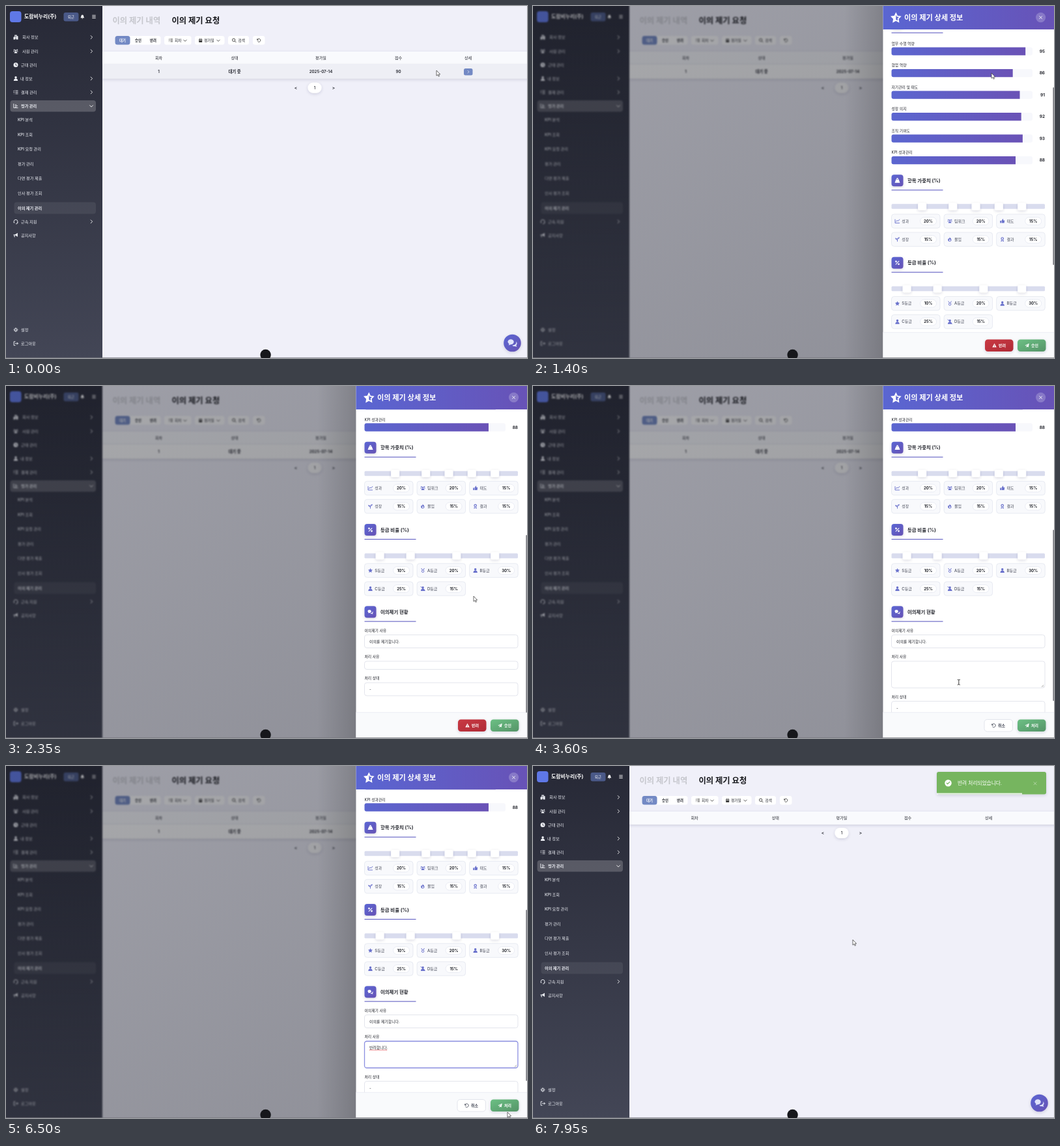
Animation of 800 by 541 pixels, one loop 8000 ms. Source, as an HTML page:

```html
<!DOCTYPE html>
<html lang="ko">
<head>
<meta charset="utf-8">
<style>
html, body { margin: 0; width: 100%; height: 100%; overflow: hidden; background: #20222c; }
svg { display: block; width: 800px; height: 541px; }
text { font-family: Inter, 'Noto Sans CJK KR', 'Noto Sans CJK', sans-serif; white-space: pre; }
</style>
</head>
<body>
<svg id="stage" viewBox="0 0 800 541"></svg>
<script>
const circ = (x, y, r) => `M${x - r} ${y}a${r} ${r} 0 1 0 ${2 * r} 0a${r} ${r} 0 1 0 ${-2 * r} 0z`;

// Icons live in a box from -6 to 6; a leading ~ means stroked.
const icons = {
  building: 'M-6-1h3v-5h6v3h3v9h-12zM-1.5-4h3v1.6h-3zM-1.5-1h3v1.6h-3zM-1 3h2v3h-2z',
  users: circ(0, -2, 2) + circ(-4, -3.5, 1.5) + circ(4, -3.5, 1.5) + 'M-4 5c0-6 8-6 8 0zM-6 2c0-4 3-4 3-2zM6 2c0-4-3-4-3-2z',
  clock: circ(0, 0, 6) + 'M-.7-4v4.6l3 2 .8-1.2-2.4-1.5V-4z',
  user: circ(0, -3, 3) + 'M-5.5 6c0-8 11-8 11 0z',
  slash: '~M-6-6L6 6',
  list: '~M-6-4l1 1 2-2M-6 0l1 1 2-2M-5 4h1M-1-4h7M-1 0h7M-1 4h7',
  chart: '~M-5.5-6V5H6M-2-3h4M-2 0h7M-2 3h4',
  headset: '~M-5 3V0a5 5 0 0 1 10 0v4l-3 2H0M-4 1v3M4 1v3',
  horn: 'M-6-2h4l7-4v10l-7-4h-1l1 5h-2l-1-5h-1z',
  gear: '~' + circ(0, 0, 3) + 'M0-6v3M0 3v3M-6 0h3M3 0h3M-4-4l2 2M2 2l2 2M-4 4l2-2M2-2l2-2',
  logout: '~M-1-5h-4v10h4M-2 0h8M3-3l3 3-3 3',
  star: 'M0-6l1.8 3.8 4.2.6-3 3 .7 4.2-3.7-2-3.7 2 .7-4.2-3-3 4.2-.6z',
  outline: '~M0-6l1.8 3.8 4.2.6-3 3 .7 4.2-3.7-2-3.7 2 .7-4.2-3-3 4.2-.6z',
  half: 'M0-6v9.6l-3.7 2 .7-4.2-3-3 4.2-.6z',
  clip: 'M-4-5h2v-1h4v1h2v11h-8zM-2-1h4v1h-4zM-2 2h4v1h-4z',
  weight: 'M-3-3h6l3 8h-12z' + circ(0, -4, 2),
  percent: '~M-4 4L4-4' + circ(-3, -3, 1.3) + circ(3, 3, 1.3),
  chats: 'M-6-1a4 3.5 0 1 1 4 3l-3 1 .8-1.5zM0 3a5 4 0 0 0 5-5c2 2 1 4 0 5l1 2-3-.8q-2 .5-3-1.2z',
  line: '~M-6-5V5H6M-4 2l3-4 3 2 4-5',
  thumb: 'M-6-1h3v6h-3zM-2-1l3-5q2 0 1.5 2l-.5 2h4l-1 7h-7z',
  seed: '~M0 6V0M0 1q-1-4-5-4 0 4 5 4M0-1q1-4 5-4 0 4-5 4',
  fire: 'M-1-6q5 3 5 7a4.5 4.5 0 1 1-9 0q0-3 2-4l1 2q2-2 1-5z' + circ(0, 2, 2),
  award: circ(0, -2, 4) + circ(0, -2, 2) + 'M-3 2l-1 4 3-1 1-2 1 2 3 1-1-4q-3 2-6 0z',
  medal: '~' + circ(0, 2, 3) + 'M-4-6l3 5M4-6l-3 5',
  warn: 'M0-6l6 11h-12zM-.7-2v3.5h1.4v-3.5zM-.7 2.7v1.3h1.4v-1.3z',
  plane: 'M6-6l-2 11-4-2-2 3v-4l6-6-7 5-3-1.3z',
  undo: '~M-5-5v4h4M-5-1a5 5 0 1 1 1 4',
  check: circ(0, 0, 6) + 'M-3.5 0l2.5 2.5 4.5-4.5-1-1-3.5 3.5-1.5-1.5z',
  search: '~' + circ(-1, -1, 4) + 'M2 2l4 4',
  bell: 'M-5 3q2-2 2-5 0-3 3-3t3 3q0 3 2 5zM-1.5 4h3q-1.5 3-3 0z',
  bars: '~M-5-4h10M-5 0h10M-5 4h10',
  cal: 'M-5-4h2v-2h1v2h4v-2h1v2h2v10h-10zM-4-2h8v2h-8z',
  right: '~M-2-5l5 5-5 5',
  down: '~M-5-2l5 5 5-5',
  close: '~M-4-4l8 8M-4 4l8-8'
};

const icon = (name, x, y, size, color) => {
  const d = icons[name], line = d[0] === '~';
  const paint = line ? `fill="none" stroke="${color}" stroke-width="1.6"` : `fill="${color}" fill-rule="evenodd"`;
  return `<path transform="translate(${x} ${y}) scale(${size / 12})" d="${line ? d.slice(1) : d}" ${paint}/>`;
};
const text = (x, y, s, size = 6.2, weight = 500, color = '#24262e', anchor = 'start', more = '') =>
  `<text x="${x}" y="${y + size * .36}" font-size="${size}" font-weight="${weight}" fill="${color}" text-anchor="${anchor}" ${more}>${s}</text>`;
const mid = (x, y, s, size, weight, color) => text(x, y, s, size, weight, color, 'middle');
const rect = (x, y, w, h, r, fill, more = '') =>
  `<rect x="${x}" y="${y}" width="${w}" height="${h}" rx="${r}" fill="${fill}" ${more}/>`;
const group = (id, body, more = '') => `<g id="${id}" ${more}>${body}</g>`;
const grad = (id, a, b, dir = 'x2="1" y2="1"') =>
  `<linearGradient id="${id}" x1="0" y1="0" ${dir}><stop stop-color="${a}"/><stop offset="1" stop-color="${b}"/></linearGradient>`;
const shade = 'filter="url(#soft)"';
const halfStar = (x, y, s) => icon('half', x, y, s, '#fff') + icon('outline', x, y, s, '#fff');

function sidebar() {
  const pale = '#eceef4';
  let s = rect(-20, -20, 168, 581, 0, 'url(#side)') + rect(6, 8, 17.5, 17, 4, '#5f78e6') +
    text(28, 16.5, '도람비누리(주)', 7.9, 700, '#fff') +
    rect(88.5, 10, 23, 13.5, 3, '#4a5988') + mid(100, 16.7, '퇴근', 5.4, 500, '#fff') +
    icon('bell', 117.3, 16.5, 7, '#fff') + icon('bars', 135, 16.5, 6.5, '#fff') +
    rect(6.5, 145, 131.5, 17.5, 4, '#fff', 'opacity=".2"') +
    rect(12.5, 301.5, 125.5, 18, 4, '#fff', 'opacity=".07"');
  [['building', '회사 정보', 48, 1, 25], ['users', '사원 관리', 69.5, 1, 25], ['clock', '근태 관리', 90.5, 0, 23],
   ['user', '내 정보', 111.5, 1, 22], ['list', '결재 관리', 132.5, 1, 23], ['chart', '평가 관리', 153.5, 2, 23],
   ['headset', '근속 지원', 331.3, 1, 23], ['horn', '공지사항', 352.3, 0, 23],
   ['gear', '설정', 497.7, 0, 23], ['logout', '로그아웃', 518.7, 0, 23]
  ].forEach(([ic, label, y, arrow, x]) => {
    s += icon(ic, 15, y, 7, pale) + text(x, y, label, 6.2, arrow > 1 ? 700 : 500, pale);
    if (arrow) s += icon(arrow > 1 ? 'down' : 'right', 131, y, 6.5, '#fff');
  });
  ['KPI 분석', 'KPI 조회', 'KPI 요청 관리', '평가 관리', '다면 평가 제출', '인사 평가 조회', '이의 제기 관리']
    .forEach((label, i) => s += text(18, 174.7 + i * 22.6, label, 6.2, i > 5 ? 700 : 500, pale));
  return s;
}

const pager = y => rect(463.5, y - 8, 21, 16, 8, '#fff', shade) + mid(474, y, '1', 6) +
  mid(445, y, '&lt;', 6.5, 600) + mid(503, y, '&gt;', 6.5, 600);
const heads = xs => ['회차', '상태', '평가일', '점수', '상세'].map((h, i) => mid(xs[i], 79.5, h, 6.1)).join('');

function page() {
  const box = (x, w) => rect(x, 46, w, 13.5, 3.5, '#fff');
  return rect(148, -20, 680, 581, 0, '#f0f0f9') +
    text(163.5, 23, '이의 제기 내역', 12.3, 700, '#c6c7cd') + text(254.5, 23, '이의 제기 요청', 12.3, 700, '#17181c') +
    box(167, 70.5) + box(243, 41.5) + box(290, 45.5) + box(341, 32) + box(379, 18.5) +
    rect(167.5, 46, 23, 13.5, 3.5, '#7389c4') + mid(179, 52.8, '대기', 5.4, 600, '#fff') +
    mid(203, 52.8, '승인', 5.4, 600) + mid(226, 52.8, '반려', 5.4, 600) +
    icon('list', 253, 52.8, 6, '#333') + text(259, 52.8, '회차', 5.6) + icon('down', 275, 52.8, 6, '#333') +
    icon('cal', 298.7, 52.8, 6, '#333') + text(304.2, 52.8, '평가일', 5.6) + icon('down', 326, 52.8, 6, '#333') +
    icon('search', 350.2, 52.8, 6.5, '#333') + text(356.6, 52.8, '검색', 5.6) + icon('undo', 388.3, 52.8, 6, '#333') +
    rect(148, 70, 680, 19.8, 0, '#f9fafd', shade) +
    group('full', heads([234.5, 351, 483.5, 602.5, 709.5]) +
      rect(148, 90, 680, 21.5, 0, '#fff', shade + ' id="row"') +
      mid(234.5, 101, '1', 6.2, 600) + mid(351, 101, '대기 중', 6.4, 600) +
      mid(483.5, 101, '2025-07-14', 6.2, 600) + mid(602.5, 101, '90', 6.2, 600) +
      rect(703, 96, 13.5, 10.5, 2.5, '#7389c4') + icon('right', 709.7, 101.2, 5, '#fff') + pager(125.7)) +
    group('empty', heads([248, 372.3, 474, 575.5, 699.5]) + pager(103)) +
    `<circle cx="777.5" cy="518" r="13.3" fill="url(#violet)" ${shade}/>` + icon('chats', 777.5, 518, 14, '#dfe3fb');
}

const tile = (x, y, w, h, more = '') => rect(x, y, w, h, 3.5, '#fff', `stroke="#dcdfe8" stroke-width=".8" ${more}`);
const field = (x, y, w, label, value) =>
  text(x, y - 17, label, 5.8) + tile(x, y - 10, w, 20) + text(x + 7.5, y, value, 5.9, 400);
const section = (y, ic, title) => rect(550.5, y - 9, 18, 18, 4, 'url(#violet)', shade) +
  (ic === 'half' ? halfStar(559.5, y, 8) : icon(ic, 559.5, y, 8, '#fff')) +
  text(575, y, title, 7.4, 700) + rect(550.5, y + 14, 79, 1.1, 0, '#6260c4');

function split(y, parts) {
  let s = rect(550.5, y - 3.8, 235.5, 7.5, 1.5, '#d9dcee'), sum = 0;
  parts.forEach(([ic, label, pct], i) => {
    const x = 550.5 + i % 3 * 80.6, cy = y + 22.5 + (i > 2) * 28;
    s += rect(x, cy - 10.7, 74.5, 21.4, 4, '#f8f9fc', 'stroke="#e3e6ef" stroke-width=".8"') +
      icon(ic, x + 9, cy, 7, '#6a72cc') + (label[0] === 'D' ? icon('slash', x + 9, cy, 7, '#6a72cc') : '') +
      text(x + 15.8, cy, label, 6, 500, '#4a4e5c') +
      rect(x + 44, cy - 6, 25, 12, 6, '#fff', 'stroke="#e3e6ef" stroke-width=".7"') + mid(x + 56.5, cy, pct + '%', 6, 700);
    sum += pct;
    if (sum < 100) s += rect(544 + sum * 2.355, y - 5.5, 13, 11, 2.5, '#fff', shade);
  });
  return s;
}

function content() {
  const bars = [['업무 수행 역량', 95], ['협업 역량', 86], ['자기관리 및 태도', 91], ['성장 의지', 92], ['조직 기여도', 93], ['KPI 성과관리', 88]];
  return section(53, 'clip', '인사 평가 정보') +
    field(550.5, 98, 113, '회차', '1') + field(673, 98, 113, '사원명', '남도율 (20240007)') +
    field(550.5, 138.5, 113, '점수', '90') + field(673, 138.5, 113, '평가일', '2024-01-22') +
    section(174, 'half', '요인별 평가 결과') +
    bars.map(([label, v], i) => {
      const y = 217 + i * 33.5;
      return text(550.5, y - 11.8, label, 5.8, 400) + rect(550.5, y - 6.2, 216.5, 12.4, 3, '#f7f8fc') +
        `<path d="M${550.5 + 2.165 * v} ${y - 6.2}v12.4H553.5q-3 0-3-3v-6.4q0-3 3-3z" fill="url(#bar)"/>` +
        text(786, y, v, 6.4, 700, '#24262e', 'end');
    }).join('') +
    section(415.7, 'weight', '항목 가중치 (%)') +
    split(455.5, [['line', '성과', 20], ['users', '팀워크', 20], ['thumb', '태도', 15], ['seed', '성장', 15], ['fire', '몰입', 15], ['award', '결과', 15]]) +
    section(542, 'percent', '등급 비율 (%)') +
    split(582, [['star', 'S등급', 10], ['medal', 'A등급', 20], ['user', 'B등급', 30], ['user', 'C등급', 25], ['user', 'D등급', 15]]) +
    section(668.3, 'chats', '이의제기 현황') +
    field(550.5, 713.5, 235.5, '이의제기 사유', '이의를 제기합니다.') +
    text(550.5, 736.6, '처리 사유', 5.8) + tile(550.5, 744, 235.5, 12.5, 'id="area"') +
    group('typing', text(558, 754, '', 5.8, 400, '#24262e', 'start', 'id="typed"') +
      rect(0, 750, .6, 7.5, 0, '#222', 'id="caret"') +
      '<path id="wave" d="M558 757.6h27" stroke="#e0454a" stroke-width="1" stroke-dasharray="1.2 .8"/>' +
      '<path d="M781 783.5l3-3M783 783.5l1-1" stroke="#666" stroke-width=".6"/>') +
    group('status', field(550.5, 787, 235.5, '처리 상태', '-'));
}

const button = (x, fill, ic, label, color, more = shade) =>
  rect(x, 512.5, 43.5, 18.5, 4.5, fill, more) + icon(ic, x + 14.5, 521.8, 6.5, color) + text(x + 21, 521.8, label, 6, 600, color);

const panel = () => rect(537.5, 0, 270, 541, 0, '#fff') +
  `<g clip-path="url(#view)">${group('scroll', content())}</g>` +
  rect(537.5, 501.5, 270, 40, 0, '#f9fafc') + rect(537.5, 501.5, 270, .7, 0, '#e6e8ef') +
  group('decide', button(694, 'url(#red)', 'warn', '반려', '#fff') + button(744, 'url(#green)', 'plane', '승인', '#fff')) +
  group('submit', button(693, '#fff', 'undo', '취소', '#454957', 'stroke="#dcdfe8" stroke-width=".8"') + button(744, 'url(#green)', 'plane', '처리', '#fff')) +
  rect(537.5, 0, 270, 36, 0, 'url(#head)') + halfStar(557.3, 18, 13) +
  text(570, 18, '이의 제기 상세 정보', 11.2, 700, '#fff') +
  '<circle cx="779.6" cy="17.6" r="7.6" fill="#fff" opacity=".22"/>' + icon('close', 779.6, 17.6, 6.5, '#fff') +
  rect(798.4, 37, 1.6, 273, .8, '#77787f', 'id="thumb"');

const toast = () => rect(620, 9, 168, 34.6, 3, '#76b55f', shade) + icon('check', 637.5, 26.3, 10.5, '#fff') +
  text(652, 26.3, '반려 처리되었습니다.', 7.7, 400, '#fff') + icon('close', 771, 26.8, 7, '#b5d8a8') +
  rect(620, 41.6, 168, 2, 0, '#fff', 'id="life" opacity=".85"');

document.getElementById('stage').innerHTML = `<defs>
  ${grad('side', '#262835', '#444757', 'x2="0" y2="1"')}${grad('violet', '#5a67d4', '#6752b4')}
  ${grad('bar', '#5b66d0', '#6a52b6', 'x2="1" y2="0"')}${grad('head', '#5a66d2', '#6852b6', 'x2="1" y2="0"')}
  ${grad('red', '#c93a44', '#b02a36')}${grad('green', '#6cc084', '#559468')}
  <linearGradient id="dim" x2="1" y2="1"><stop stop-color="#15171f" stop-opacity=".37"/><stop offset="1" stop-color="#15171f" stop-opacity=".45"/></linearGradient>
  <linearGradient id="edge"><stop stop-opacity="0"/><stop offset="1" stop-opacity=".16"/></linearGradient>
  <filter id="soft" x="-20%" y="-40%" width="140%" height="200%"><feDropShadow dx="0" dy="1.5" stdDeviation="2" flood-color="#20264a" flood-opacity=".16"/></filter>
  <clipPath id="view"><rect x="537" y="36" width="263" height="466"/></clipPath></defs>` +
  group('app', page() + sidebar()) + rect(0, 0, 800, 541, 0, 'url(#dim)', 'id="veil"') +
  group('panel', rect(477.5, 0, 60, 541, 0, 'url(#edge)') + panel()) +
  rect(0, 540.3, 800, .7, 0, '#77787f') + '<circle cx="398.6" cy="536" r="8.2" fill="#16171b"/>' + group('toast', toast()) +
  '<path id="arrow" d="M0 0v8.2l1.9-1.7 1.3 2.8 1.3-.6-1.3-2.7h2.5z" fill="#fff" stroke="#333" stroke-width=".7"/>' +
  '<path id="beam" d="M-2-4q2 0 2 1 0-1 2-1M0-3v6M-2 4q2 0 2-1 0 1 2 1" fill="none" stroke="#222" stroke-width=".9"/>';

const $ = id => document.getElementById(id);
const set = (id, attrs) => Object.entries(attrs).forEach(([k, v]) => $(id).setAttribute(k, v));
const show = (id, on) => $(id).style.display = on ? '' : 'none';
const clamp = v => Math.max(0, Math.min(1, v));
const smooth = v => v * v * (3 - 2 * v);
const out = v => 1 - (1 - v) ** 3;

// Keys are [time, ...values].
function along(keys, t, ease = smooth) {
  let i = 0;
  while (i < keys.length - 2 && t >= keys[i + 1][0]) i++;
  const [a, b] = [keys[i], keys[i + 1]], p = ease(clamp((t - a[0]) / (b[0] - a[0])));
  return a.slice(1).map((v, n) => v + (b[n + 1] - v) * p);
}

const path = [[0, 661, 99], [300, 709, 101], [800, 708, 103], [1150, 708, 103], [1400, 704, 103], [1950, 704, 108],
  [2350, 718, 323], [2900, 716, 522], [3150, 716, 522], [3700, 648, 449], [5250, 648, 449], [6100, 765, 521],
  [6500, 770, 532], [6900, 768, 528], [7900, 491, 267]];
const wheel = [[1150, 0], [1400, 147], [1900, 321]];
const bounce = [[6850, 260], [7300, -4], [7412, 2], [7525, -1], [7600, 0]];
const keys = [[3850, 'ㅂ'], [3930, '바'], [4010, '반'], [4090, '반ㄹ'], [4170, '반려'], [4250, '반렿'], [4340, '반려하'], [4450, '반려합'],
  [4550, '반려합ㄴ'], [4750, '반려합니'], [4850, '반려합닏'], [4950, '반려합니다'], [5050, '반려합니다.']];

function render(t) {
  const open = out(clamp((t - 400) / 400)) * (1 - smooth(clamp((t - 6600) / 350)));
  const rejecting = t >= 3100, focus = t >= 3750, done = t >= 6900;
  const [scroll] = along(wheel, t, v => v), [x, y] = along(path, t);

  $('app').style.filter = open > 0 ? `blur(${1.3 * open}px)` : 'none';
  set('veil', { opacity: open });
  set('panel', { transform: `translate(${(1 - open) * 265} 0)` });
  show('panel', open > 0);
  show('full', !done);
  show('empty', done);
  set('row', { fill: t < 400 ? '#eeeff5' : '#fff' });

  set('scroll', { transform: `translate(0 ${-scroll})` });
  set('thumb', { y: 37 + scroll * (rejecting ? .573 : .598), height: rejecting ? 263 : 273 });
  set('area', { height: rejecting ? 41 : 12.5, stroke: focus ? '#8b8fe0' : '#dcdfe8', 'stroke-width': focus ? 1.3 : .8 });
  set('status', { transform: `translate(0 ${rejecting ? 28.5 : 0})` });
  show('decide', !rejecting);
  show('submit', rejecting);
  show('typing', rejecting);

  const last = keys.filter(k => k[0] <= t).pop() || [3750, ''];
  $('typed').textContent = last[1];
  set('caret', { x: 558.3 + (rejecting && open ? $('typed').getComputedTextLength() : 0) });
  show('caret', focus && (t - last[0]) % 960 < 480);
  show('wave', t >= 5600);

  show('toast', t >= 6850);
  set('toast', { transform: `translate(${along(bounce, t)[0]} 0)` });
  set('life', { width: 168 * clamp(1 - (t - 6850) / 5000) });

  const over = (l, top, r, b) => x > l && x < r && y > top && y < b;
  const beam = open > .9 && (scroll < 5 && over(673, 88, 786, 108) || rejecting && over(550, 423, 786, 464));
  show('beam', beam);
  show('arrow', !beam);
  set(beam ? 'beam' : 'arrow', { transform: `translate(${x} ${y})` });
}

const start = performance.now();
function tick() {
  render((performance.now() - start) % 8000);
  requestAnimationFrame(tick);
}
tick();
</script>
</body>
</html>
```
